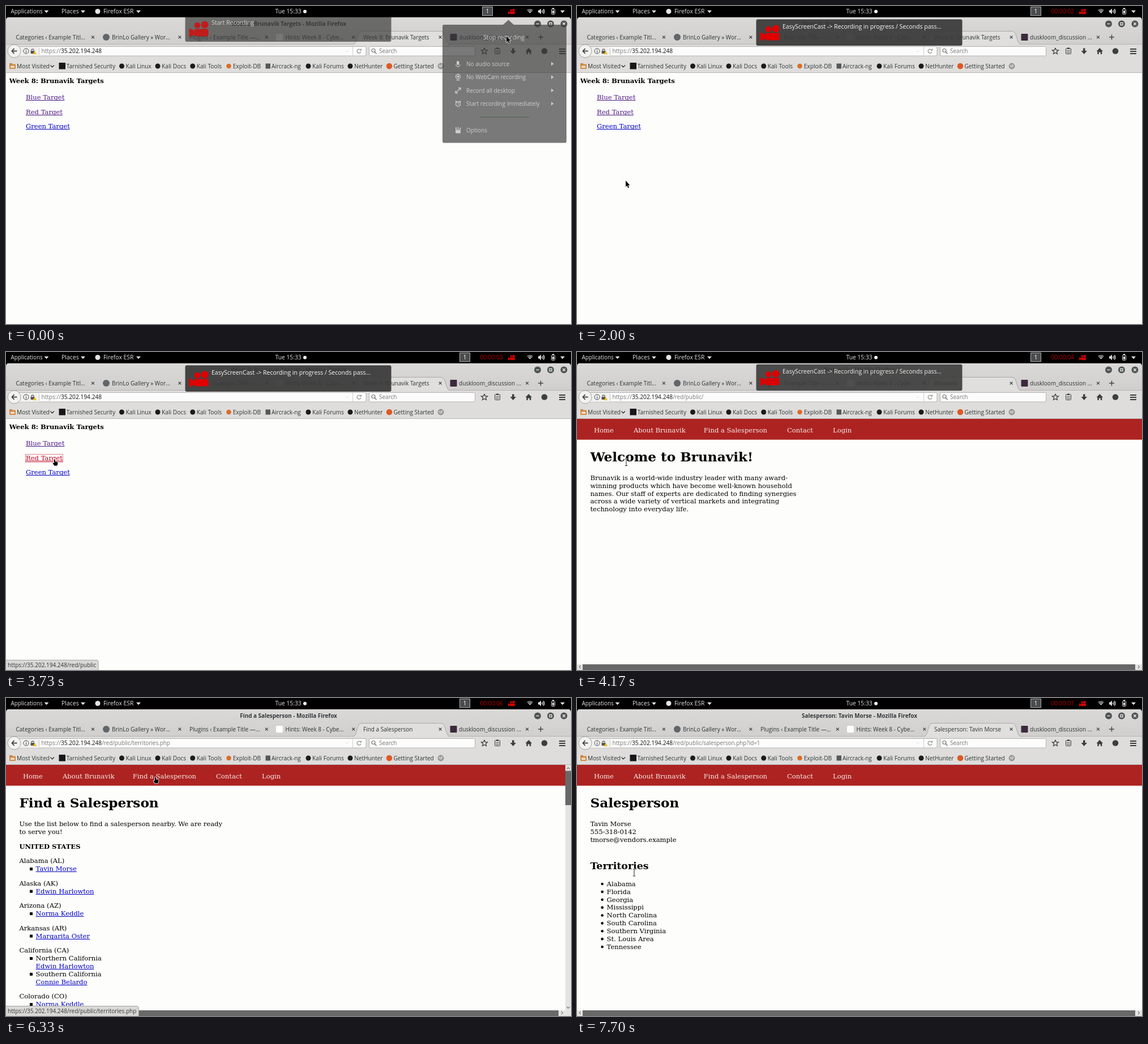
An HTML page with a canvas for the animation above (8 s loop, 998 by 561 pixels).

```html
<!DOCTYPE html>
<html lang="en">
<head>
<meta charset="utf-8">
<title>Browser session</title>
<style>
html, body { margin: 0; width: 100%; height: 100%; overflow: hidden; background: #000; }
canvas { display: block; width: 100%; height: 100%; }
</style>
</head>
<body>
<canvas id="stage" width="998" height="561"></canvas>
<script>
const ctx = document.getElementById('stage').getContext('2d');
const LOOP = 8000;
const UI = '"Open Sans", "Noto Sans", sans-serif';
const SERIF = '"DejaVu Serif", "Noto Serif", serif';
const EM = 11.59, LINE = 13.88;
const BLUE = '#0000c4', VISITED = '#4d1a85', DARK = '#3c3f40';
const HOST = '35.202.194.248';
const BRAND = 'Brunavik';
const AGENT = 'Tavin Morse';

const clamp = v => Math.max(0, Math.min(1, v));
const ease = v => v * v * (3 - 2 * v);
const between = (t, a, b) => t >= a && t < b;

// Pointer stops: time, x, y
const PATH = [
  [0, 884, 53], [30, 884, 53], [500, 100, 330], [770, 100, 330], [1270, 86, 308],
  [2000, 86, 308], [2730, 86, 226], [2830, 86, 226], [3100, 86, 190],
  [4600, 86, 190], [5370, 234, 155], [5500, 234, 155], [5850, 264, 140],
  [6330, 264, 140], [7120, 100, 303.5], [LOOP, 100, 303.5]
];

const PAGES = [
  { from: 0, title: `Week 8: ${BRAND} Targets`, path: '', draw: drawHome },
  { from: 4030, title: BRAND, path: '/red/public/', draw: drawWelcome },
  { from: 6150, title: 'Find a Salesperson', path: '/red/public/territories.php', draw: drawTerritories },
  { from: 7560, title: `Salesperson: ${AGENT}`, path: '/red/public/salesperson.php?id=1', draw: drawSalesperson }
];

let hits = [];

function text(str, x, y, color = '#2e3436', size = 10, weight = 400, family = UI, align = 'left') {
  ctx.font = `${weight} ${size}px ${family}`;
  ctx.textAlign = align;
  ctx.fillStyle = color;
  ctx.fillText(str, x, y);
  return ctx.measureText(str).width;
}
function rect(x, y, w, h, color) {
  ctx.fillStyle = color;
  ctx.fillRect(x, y, w, h);
}
function round(x, y, w, h, r, fill, stroke) {
  ctx.beginPath();
  ctx.roundRect(x, y, w, h, r);
  if (fill) { ctx.fillStyle = fill; ctx.fill(); }
  if (stroke) { ctx.lineWidth = 1; ctx.strokeStyle = stroke; ctx.stroke(); }
}
function disc(x, y, r, color) {
  ctx.beginPath();
  ctx.arc(x, y, r, 0, 7);
  ctx.fillStyle = color;
  ctx.fill();
}
function ring(x, y, r, color, width = 1, a = 0, b = 7) {
  ctx.beginPath();
  ctx.arc(x, y, r, a, b);
  ctx.strokeStyle = color;
  ctx.lineWidth = width;
  ctx.stroke();
}
function trace(points) {
  ctx.beginPath();
  for (let i = 0; i < points.length; i += 2) ctx.lineTo(points[i], points[i + 1]);
}
function line(points, color, width = 1) {
  trace(points);
  ctx.strokeStyle = color;
  ctx.lineWidth = width;
  ctx.stroke();
}
function poly(points, color) {
  trace(points);
  ctx.closePath();
  ctx.fillStyle = color;
  ctx.fill();
}
function at(x, y, draw, scale = 1) {
  ctx.save();
  ctx.translate(x, y);
  ctx.scale(scale, scale);
  draw();
  ctx.restore();
}
const caret = (x, y, color) => poly([x - 4, y - 2, x + 4, y - 2, x, y + 2.5], color);
function cross(x, y, r, color, width) {
  line([x - r, y - r, x + r, y + r], color, width);
  line([x - r, y + r, x + r, y - r], color, width);
}

function camera(x, y, scale, color) {
  at(x, y, () => {
    disc(14.5, 8, 5.3, color);
    disc(27.5, 7, 6.4, color);
    round(9, 14.5, 25, 13, 3, color);
    poly([0, 14, 3, 14, 9, 18, 9, 24, 3, 28, 0, 28], color);
  }, scale);
}

// Page content
function pageText(str, x, y, { size = EM, weight = 400, color = '#000', url } = {}) {
  const w = text(str, x, y, color, size, weight, SERIF);
  hits.push({ x, y: y - size * 0.939, w, h: size * 1.175, url });
  return w;
}
function link(str, x, y, color, url, active) {
  const shade = active ? '#c00020' : color;
  const w = pageText(str, x, y, { color: shade, url });
  rect(x, Math.round(y) + 1, w, 1, shade);
  if (active) {
    ctx.setLineDash([1, 1]);
    ctx.lineWidth = 1;
    ctx.strokeStyle = shade;
    ctx.strokeRect(x - 0.5, Math.round(y) - 10.5, w + 1, 14);
    ctx.setLineDash([]);
  }
}
const lines = (list, x, y) => list.forEach((s, i) => pageText(s, x, y + i * LINE));
const heading = str => pageText(str, 23.4, 193, { size: EM * 2, weight: 700 });

function drawHome(t) {
  pageText(`Week 8: ${BRAND} Targets`, 5.8, 135.8, { weight: 700 });
  ['Blue', 'Red', 'Green'].forEach((name, i) =>
    link(`${name} Target`, 35, 165 + i * 25.57, i < 2 ? VISITED : BLUE,
      `/${name.toLowerCase()}/public`, i === 1 && t >= 3730));
}
function drawNav() {
  rect(0, 118, 998, 36.7, '#ad2321');
  [['Home', 30, ''], [`About ${BRAND}`, 100, 'about.php'],
   ['Find a Salesperson', 223.7, 'territories.php'],
   ['Contact', 371, 'contact.php'], ['Login', 452, 'staff/login.php']]
    .forEach(([s, x, file]) => pageText(s, x, 141.7, { color: '#f4ecea', url: `/red/public/${file}` }));
}
function drawWelcome() {
  drawNav();
  heading(`Welcome to ${BRAND}!`);
  lines([`${BRAND} is a world-wide industry leader with many award-`,
    'winning products which have become well-known household',
    'names. Our staff of experts are dedicated to finding synergies',
    'across a wide variety of vertical markets and integrating',
    'technology into everyday life.'], 23.4, 225.8);
  bottomBar(998);
}
function drawTerritories(t) {
  const people = [AGENT, 'Edwin Harlowton', 'Norma Keddle', 'Margarita Oster', 'Connie Belardo'];
  const person = (i, y, active) =>
    link(people[i], 52.6, y, BLUE, `/red/public/salesperson.php?id=${i + 1}`, active);
  const bullet = y => rect(42, y - 6, 5, 5, '#000');
  drawNav();
  heading('Find a Salesperson');
  lines(['Use the list below to find a salesperson nearby. We are ready', 'to serve you!'], 23.4, 225.8);
  pageText('UNITED STATES', 23.4, 265.8, { weight: 700 });
  ['Alabama (AL)', 'Alaska (AK)', 'Arizona (AZ)', 'Arkansas (AR)'].forEach((state, i) => {
    const y = 291.3 + i * 39.45;
    pageText(state, 23.4, y);
    bullet(y + LINE);
    person(i, y + LINE, i === 0 && t >= 7250);
  });
  pageText('California (CA)', 23.4, 449.1);
  bullet(463);
  pageText('Northern California', 52.6, 463);
  person(1, 476.9);
  bullet(490.8);
  pageText('Southern California', 52.6, 490.8);
  person(4, 504.7);
  pageText('Colorado (CO)', 23.4, 530.2);
  bullet(544.1);
  person(2, 544.1);
  bottomBar(988);
  rect(988, 118, 10, 443, '#e4e4e2');
  rect(988, 128.5, 10, 60.5, '#686868');
  line([990.5, 125.5, 993, 122.5, 995.5, 125.5], '#333');
  line([990.5, 544.5, 993, 547.5, 995.5, 544.5], '#333');
}
function drawSalesperson() {
  drawNav();
  heading('Salesperson');
  lines([AGENT, '555-318-0142', 'tmorse@vendors.example'], 23.4, 225.8);
  pageText('Territories', 23.4, 301.8, { size: EM * 1.5, weight: 700 });
  const areas = ['Alabama', 'Florida', 'Georgia', 'Mississippi', 'North Carolina',
    'South Carolina', 'Southern Virginia', 'St. Louis Area', 'Tennessee'];
  lines(areas, 52.6, 331.8);
  areas.forEach((_, i) => disc(44.6, 328 + i * LINE, 2.3, '#000'));
  bottomBar(998);
}
function bottomBar(w) {
  rect(0, 551, w, 10, '#e4e4e2');
  rect(10, 551, w - 22, 10, '#686868');
  line([6.5, 553, 4, 555.5, 6.5, 558], '#333');
  line([w - 7, 553, w - 4.5, 555.5, w - 7, 558], '#333');
}

// Browser window
function drawChrome(page) {
  const g = ctx.createLinearGradient(0, 20, 0, 68);
  g.addColorStop(0, '#dad9d7');
  g.addColorStop(1, '#d0cfcd');
  round(0, 19.7, 998, 60, [5, 5, 0, 0], g);
  text(`${page.title} - Mozilla Firefox`, 499, 35, '#33383a', 9.9, 700, UI, 'center');
  [939, 962, 985.5].forEach(x => disc(x, 31.5, 6, '#505455'));
  line([936.5, 31.5, 941.5, 31.5], '#eee', 1.3);
  ctx.strokeRect(960, 29.5, 4, 4);
  cross(985.5, 31.5, 2.2, '#eee', 1.3);

  rect(0, 67, 998, 1, '#b4b3b1');
  ctx.beginPath();
  ctx.moveTo(612, 68);
  ctx.bezierCurveTo(622, 68, 618, 44.5, 628, 44.5);
  ctx.lineTo(768, 44.5);
  ctx.bezierCurveTo(779, 44.5, 775, 68, 785, 68);
  ctx.fillStyle = '#e0dfdd';
  ctx.fill();
  ctx.strokeStyle = '#a9a8a6';
  ctx.lineWidth = 1;
  ctx.stroke();
  rect(0, 68, 998, 49, '#dedddb');
  rect(0, 117, 998, 1, '#b5b5b3');

  text('Categories ‹ Example Titl...', 17.5, 58.6);
  text('BrinLo Gallery » Wor...', 187, 58.6);
  text('Plugins ‹ Example Title —...', 324, 58.6);
  text('Hints: Week 8 - Cybe...', 493.5, 58.6);
  text(page.title, 631, 58.6);
  text('duskloom_discussion ...', 800, 58.6);
  for (let i = 0; i < 6; i++) cross(153.5 + i * 153.4, 55, 2.4, '#3d4143', 1.3);
  disc(177, 55, 6, '#60666a');
  round(477, 49, 12, 12, 2, '#fff');
  round(784.5, 49, 12, 12, 1, '#3c2a3c');
  line([940, 55, 949, 55], DARK, 1.4);
  line([944.5, 50.5, 944.5, 59.5], DARK, 1.4);

  drawToolbar(page);
  drawBookmarks();
}
function drawToolbar(page) {
  round(20, 71.5, 616, 16.5, 2, '#fcfcfc', '#b3b2b0');
  rect(21, 72, 37, 16, '#f1f1ef');
  disc(14.5, 79.5, 11.5, '#f2f2f0');
  ring(14.5, 79.5, 11.5, '#a2a19f');
  line([14.5, 75, 10.5, 79.5, 14.5, 84], DARK, 1.8);
  line([10.5, 79.5, 19.5, 79.5], DARK, 1.8);
  ring(35.5, 79.5, 4.6, '#444');
  rect(35, 78.5, 1, 4, '#444');
  rect(35, 76.5, 1, 1, '#444');
  round(43.5, 79, 7, 5, 1, '#555');
  ring(47, 78.5, 2.3, '#555', 1.2, Math.PI, 0);
  poly([47.5, 85, 54, 85, 50.7, 79], '#efbb1c');
  rect(58, 74, 1, 12, '#c4c4c2');
  const a = text('https://', 62.5, 83, '#777', 10.1);
  const b = text(HOST, 62.5 + a, 83, '#111', 10.2);
  text(page.path, 62.5 + a + b, 83, '#777', 9.9);
  line([599.5, 78.5, 602, 81, 604.5, 78.5], '#ddd');
  rect(612, 72, 1, 16, '#cfcfcd');
  ring(623.5, 79.7, 3.4, '#8a8c8d', 1.2, 0.3, 5.4);
  poly([624.5, 78.6, 628, 78.6, 628, 75], '#8a8c8d');

  round(641.5, 71.5, 187, 16.5, 2, '#fcfcfc', '#b3b2b0');
  ring(649, 78.5, 3, '#777', 1.2);
  line([651, 80.8, 654.5, 84.3], '#777', 1.4);
  text('Search', 659, 83, '#777');

  const star = [];
  for (let i = 0; i < 10; i++) {
    const r = i % 2 ? 2.6 : 5.8, k = i * Math.PI / 5;
    star.push(845 + r * Math.sin(k), 79.8 - r * Math.cos(k));
  }
  line([...star, star[0], star[1]], DARK, 1.3);
  round(863.5, 75, 9, 9.5, 1, null, DARK);
  rect(866, 73.5, 4, 2.5, DARK);
  rect(865, 78.5, 6, 1, DARK);
  rect(865, 81.5, 6, 1, DARK);
  rect(894, 74.5, 3.5, 5, DARK);
  poly([890.5, 79, 901, 79, 895.7, 85], DARK);
  poly([917.5, 80, 923.3, 74, 929, 80, 927.3, 80, 927.3, 85, 924.8, 85, 924.8, 81.5, 921.8, 81.5, 921.8, 85, 919.3, 85, 919.3, 80], DARK);
  disc(951, 79.5, 5.3, DARK);
  for (let i = 0; i < 3; i++) rect(977, 75 + i * 4, 11, 2, DARK);
}
function drawBookmarks() {
  const y = 109.6;
  round(6, 101, 5, 3, 1, '#c77a35');
  round(6, 102.5, 11, 8.5, 1, '#d18a45');
  rect(8, 105.5, 7, 3.5, '#f3dfc8');
  text('Most Visited', 19, y, '#2e3436', 10.2);
  line([78.5, 104.5, 81.7, 107.7, 85, 104.5], '#333', 1.4);
  rect(93.5, 100, 11.5, 11.5, '#17171a');
  text('Tarnished Security', 106.7, y, '#2e3436', 10.1);
  [['Kali Linux', 211.5], ['Kali Docs', 275], ['Kali Tools', 336.7],
   ['Kali Forums', 541], ['NetHunter', 615]].forEach(([s, x]) => {
    disc(x - 7, 106, 4.5, '#1b1b1d');
    text(s, x, y, '#2e3436', 10.2);
  });
  disc(393.5, 106, 4.3, '#dc6c2a');
  text('Exploit-DB', 400.7, y, '#2e3436', 10.2);
  rect(458.5, 101.5, 8.5, 9, '#55585a');
  text('Aircrack-ng', 469, y, '#2e3436', 10);
  disc(677, 106, 5.3, '#dd5a24');
  text('Getting Started', 684.5, y, '#2e3436', 10.1);
  disc(768, 106, 4.8, '#a5a5a4');
  ring(768, 106, 4.8, '#777');
  line([764, 104.5, 768, 107, 771, 103.5], '#e3e3e2', 1.2);
}
function drawStatus(url) {
  const label = `https://${HOST}${url}`;
  ctx.font = `400 10px ${UI}`;
  const w = ctx.measureText(label).width + 7;
  round(-1, 543.5, w + 1, 19, [0, 3, 0, 0], '#d9d8d6', '#a8a7a5');
  text(label, 3, 556, '#33383a');
}

// Desktop shell
function drawNotice(t) {
  if (t >= 4390) return;
  const enter = clamp(t / 150), leave = clamp((t - 4120) / 270);
  ctx.save();
  ctx.globalAlpha = (0.74 + 0.26 * enter) * (1 - leave * leave);
  ctx.translate(0, -7 * (1 - enter) ** 2 - 46 * leave * leave);
  round(316.5, 23.5, 364, 46.5, 3, 'rgba(58,58,58,.93)');
  camera(323.5, 33, 1, '#e00000');
  text(t < 1000 ? 'Start Recording' : 'EasyScreenCast -> Recording in progress / Seconds pass...',
    363, 40, '#f8f8f8', 10.5, 500);
  ctx.restore();
}
function drawMenu(t) {
  const fade = 1 - clamp((t - 20) / 200);
  if (!fade) return;
  const c = '#e6e6e6';
  ctx.save();
  ctx.globalAlpha = fade * 0.78;
  ctx.beginPath();
  ctx.roundRect(771, 33, 219, 208.5, 3);
  ctx.moveTo(878, 33);
  ctx.lineTo(887.5, 24.5);
  ctx.lineTo(897, 33);
  ctx.fillStyle = 'rgba(58,58,58,.86)';
  ctx.fill();
  text('Stop recording', 843, 59.3, c, 10.7, 500);
  ['No audio source', 'No WebCam recording', 'Record all desktop', 'Start recording immediately']
    .forEach((s, i) => {
      const y = 102 + i * 23.45;
      text(s, 813, y + 3.8, c);
      poly([963, y - 3.2, 967.5, y, 963, y + 3.2], c);
    });
  rect(838, 195.5, 86, 1, '#3f5a3f');
  text('Options', 813, 222.8, c);
  round(796, 97, 4.5, 7, 2, c);
  ring(798.3, 103, 3.8, c, 1, 0, Math.PI);
  rect(797.8, 106.5, 1, 2, c);
  ring(798.5, 124.5, 4, c, 1.3);
  disc(798.5, 124.5, 2, c);
  rect(795.5, 130, 6, 1.3, c);
  line([794.5, 153, 802.5, 145], c, 1.2);
  line([799, 144.5, 803, 144.5, 803, 148.5], c, 1.3);
  line([794, 149.5, 794, 153.5, 798, 153.5], c, 1.3);
  ring(798.5, 173, 4, c, 1.4);
  line([798.5, 170.5, 798.5, 173.3, 800.5, 173.3], c);
  disc(795, 168.5, 1.3, c);
  disc(802, 168.5, 1.3, c);
  round(794, 219, 9, 5.5, 1, c);
  line([795.5, 219, 794.5, 214], c, 1.6);
  line([798.5, 219, 798.5, 213.5], c, 1.6);
  line([801.5, 219, 803, 214.5], c, 1.6);
  ctx.restore();
}
function drawPanel(t) {
  const c = '#e4e4e4', seconds = Math.floor(t / 1000);
  rect(0, 0, 998, 19.7, '#000');
  text('Applications', 8.5, 13, c, 9.9);
  caret(71.5, 9.8, c);
  text('Places', 98, 13, c, 10.5);
  caret(136, 9.8, c);
  disc(162, 9.5, 4.5, c);
  text('Firefox ESR', 172, 13, c, 10.4);
  caret(234, 9.8, c);
  text('Tue 15:33', 475.5, 13, c, 10.3);
  disc(528, 9.8, 3, '#f4f4f4');
  const box = seconds ? 801 : 841;
  round(box + 0.5, 1.5, 18, 15.5, 0, '#4a4c4d', '#b0b0b0');
  text('1', box + 9.5, 13.3, '#fff', 10.4, 400, UI, 'center');
  if (seconds) text(`00:00:0${seconds}`, 837.5, 13.2, '#b80000', 10.2);
  camera(887, 4.7, 0.35, '#d80000');

  [2, 4.5, 7].forEach(r => ring(925.5, 13, r, r > 6 ? '#999' : c, 1.6, -2.35, -0.8));
  poly([940, 7.5, 942, 7.5, 945, 4.5, 945, 14.5, 942, 11.5, 940, 11.5], c);
  [2, 4, 6].forEach(r => ring(945, 9.5, r, c, 1.2, -0.8, 0.8));
  round(963.5, 5.5, 6, 9, 1, null, c);
  rect(965, 3.5, 3, 2, c);
  rect(965, 8, 3, 5, c);
  caret(983, 9.8, c);
}

// Pointer
function pointer(t) {
  const i = PATH.findIndex(p => p[0] > t);
  const [t0, x0, y0] = PATH[i - 1], [t1, x1, y1] = PATH[i];
  const k = ease((t - t0) / (t1 - t0));
  return { x: x0 + (x1 - x0) * k, y: y0 + (y1 - y0) * k };
}
function outlined(points, width) {
  trace(points);
  ctx.closePath();
  ctx.lineJoin = 'round';
  ctx.lineWidth = width;
  ctx.strokeStyle = '#fff';
  ctx.stroke();
  ctx.fillStyle = '#000';
  ctx.fill();
  ctx.lineJoin = 'miter';
}
function drawPointer({ x, y }, hit) {
  at(x, y, () => {
    if (!hit) {
      outlined([0, 0, 0, 11, 2.4, 8.8, 4.2, 13, 6, 12.2, 4.2, 8.2, 7.4, 8.2], 1.4);
    } else if (hit.url !== undefined) {
      outlined([-1, -0.5, 0.8, -0.5, 1, 3.5, 4.5, 4, 5.5, 5, 5.3, 8, 4.3, 10.5, -0.8, 10.5, -3.4, 6.5, -2.8, 5.3, -1, 6.2], 1.5);
    } else {
      const beam = (color, w) => {
        line([1, -1, 1, 10], color, w);
        line([-1.2, -1.5, 3.2, -1.5], color, w);
        line([-1.2, 10.5, 3.2, 10.5], color, w);
      };
      beam('#fff', 2.4);
      beam('#222', 1);
    }
  });
}

function render(t) {
  const page = PAGES.filter(p => p.from <= t).pop();
  hits = [];
  rect(0, 0, 998, 561, '#000');
  rect(0, 118, 998, 443, '#fdfdfc');
  page.draw(t);
  drawChrome(page);
  const pos = pointer(t);
  const hit = hits.find(h => between(pos.x, h.x, h.x + h.w) && between(pos.y, h.y, h.y + h.h));
  if (hit && hit.url !== undefined) drawStatus(hit.url);
  drawNotice(t);
  drawMenu(t);
  drawPanel(t);
  drawPointer(pos, hit);
}

const start = performance.now();
function tick() {
  render((performance.now() - start) % LOOP);
  requestAnimationFrame(tick);
}
tick();
</script>
</body>
</html>
```
